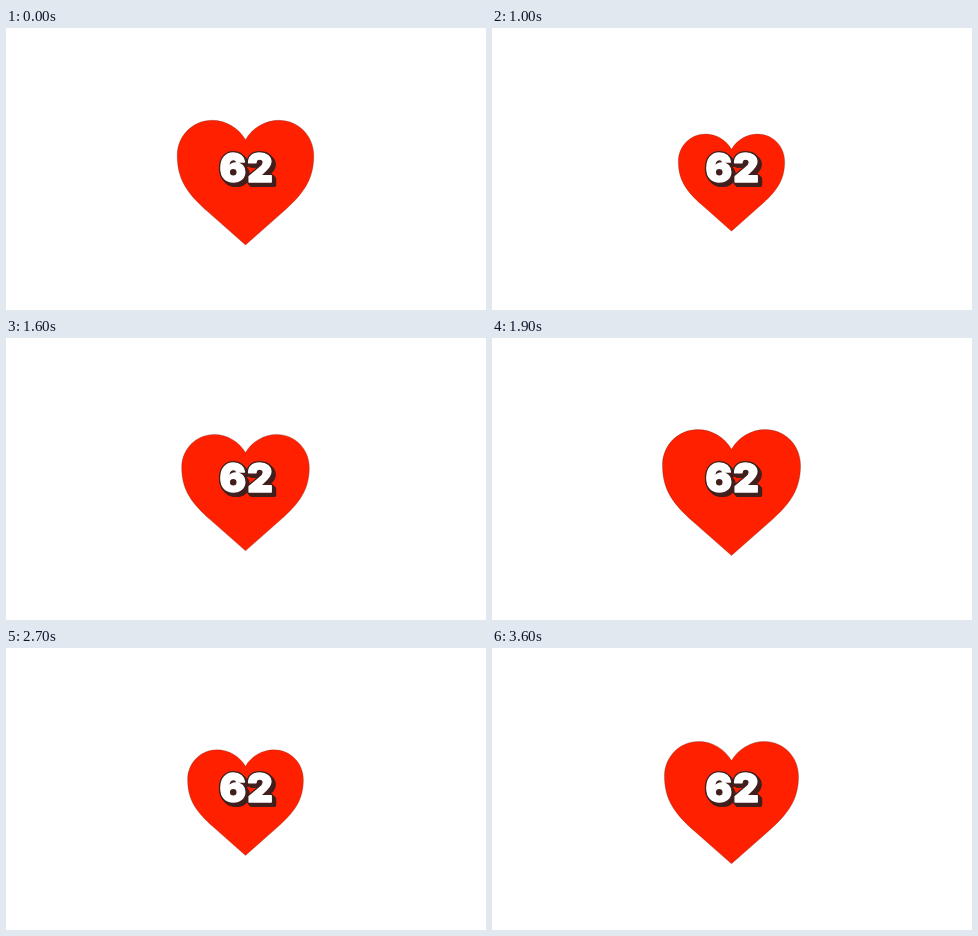
Write an HTML page that moves like this. It is 480 px wide and 282 px high and loops after 3.7 s.

```html
<!DOCTYPE html>
<html lang="en">
<head>
<meta charset="utf-8">
<title>Beating heart</title>
<style>
  html, body { margin: 0; width: 100%; height: 100%; overflow: hidden; background: #fff; }
  svg { display: block; width: 480px; height: 282px; }
  text { font: 900 39.5px Inter, "DejaVu Sans", sans-serif; letter-spacing: 1px; text-anchor: middle; stroke-linejoin: round; }
  .edge { fill: #42201e; stroke: #42201e; stroke-width: 4px; }
  .face { fill: #fff; stroke: #fff; stroke-width: 1.4px; }
</style>
</head>
<body>
<svg viewBox="0 0 480 282">
  <path id="heart" fill="#ff2000" stroke="#5a2a24" stroke-opacity=".5" stroke-width=".6"
    d="M0-43C-7-55-20-62.5-33.5-62.5C-53-62.5-68.5-47-68.5-27C-68.5-2-57 12-38 29L0 62.5L38 29C57 12 68.5-2 68.5-27C68.5-47 53-62.5 33.5-62.5C20-62.5 7-55 0-43Z"/>
  <g id="label"></g>
</svg>
<script>
  const LOOP = 3700, STEP = 100;
  const RISE = 960, FALL = 880, PEAK = 225;
  const MAX_WIDTH = 140, SHRINK = 41.5, BASE_WIDTH = 137;
  const heart = document.getElementById('heart');
  const label = document.getElementById('label');

  function addText(cls, shift) {
    const el = document.createElementNS('http://www.w3.org/2000/svg', 'text');
    el.setAttribute('class', cls);
    el.setAttribute('x', 240.7 + shift);
    el.setAttribute('y', 154 + shift);
    el.textContent = '62';
    label.append(el);
  }
  for (let shift = 3; shift >= 0; shift -= 0.5) addText('edge', shift);
  addText('face', 0);

  // Same curve as CSS ease-in: cubic-bezier(.42, 0, 1, 1)
  function easeIn(x) {
    let lo = 0, hi = 1;
    for (let i = 0; i < 24; i++) {
      const s = (lo + hi) / 2;
      const at = 1.26 * s * (1 - s) ** 2 + 3 * s * s * (1 - s) + s ** 3;
      if (at < x) lo = s; else hi = s;
    }
    return 3 * lo * lo * (1 - lo) + lo ** 3;
  }

  function draw(now) {
    const t = Math.floor((now % LOOP) / STEP) * STEP;
    const period = RISE + FALL;
    const since = (t - PEAK + period) % period;
    const away = since < FALL ? since / FALL : (period - since) / RISE;
    const scale = (MAX_WIDTH - SHRINK * easeIn(away)) / BASE_WIDTH;
    heart.setAttribute('transform', `translate(239.5 154.6) scale(${scale})`);
  }

  const start = performance.now();
  function tick() {
    draw(performance.now() - start);
    requestAnimationFrame(tick);
  }
  tick();
</script>
</body>
</html>
```
